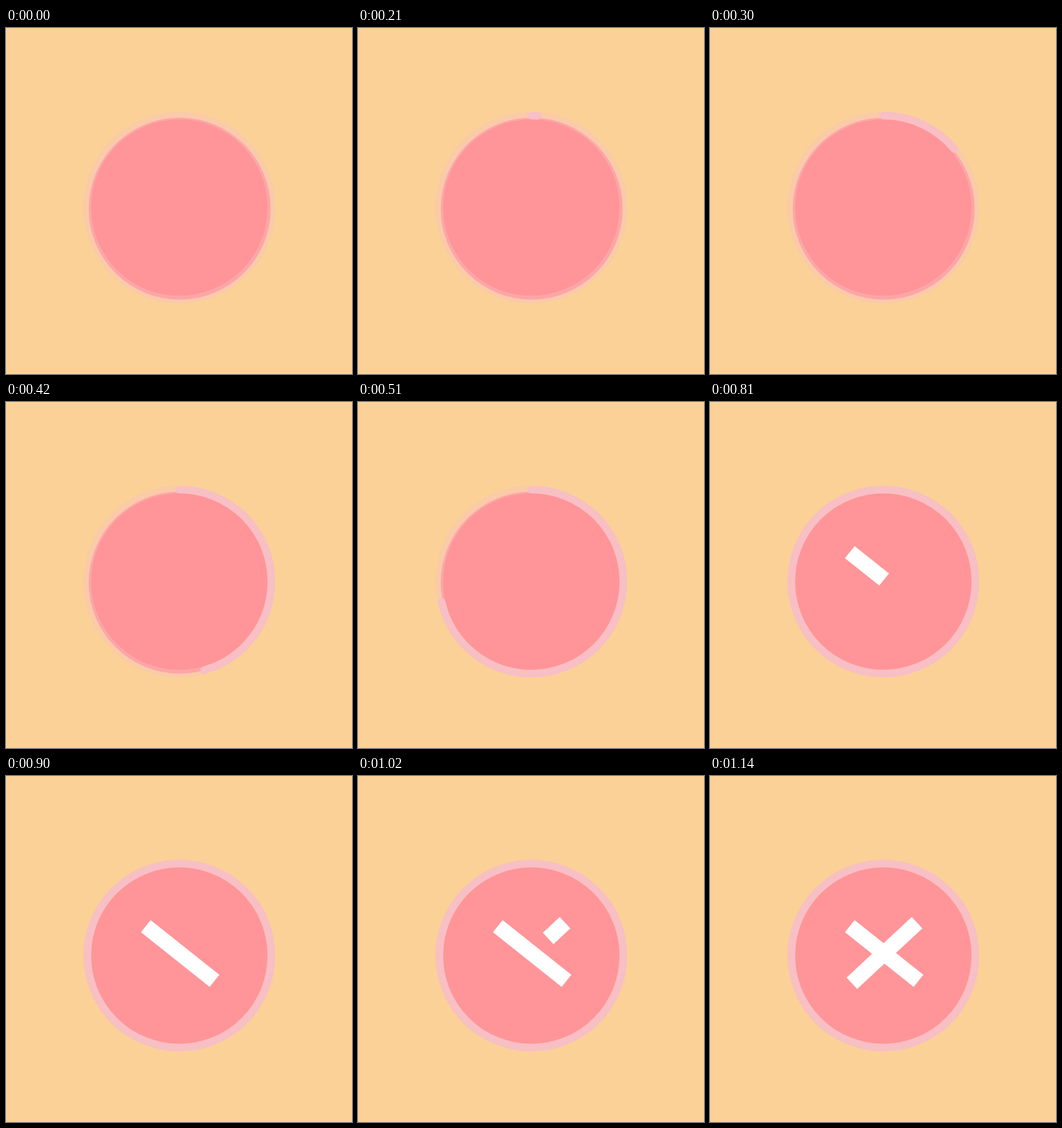
An HTML page for the animation above (1410 ms loop, 500 by 500 pixels).

```html
<!DOCTYPE html>
<html lang="en">
<head>
<meta charset="utf-8">
<title>Close button</title>
<style>
  html, body { margin: 0; width: 100%; height: 100%; overflow: hidden; background: #fbd197; }
  svg { display: block; width: 100%; height: 100%; }
</style>
</head>
<body>
<svg viewBox="0 0 500 500" fill="none">
  <rect width="500" height="500" fill="#fbd197"/>
  <circle cx="251" cy="261" r="131.5" fill="#ff9598"/>
  <g stroke="#f8bfc4" stroke-width="11">
    <circle cx="250.5" cy="259.5" r="133" opacity=".4"/>
    <path id="ring" d="M250.5 126.5a133 133 0 0 1 0 266a133 133 0 0 1 0-266" pathLength="1" stroke-linecap="round"/>
  </g>
  <g stroke="#fff" stroke-width="22.5">
    <path id="falling" d="M202 217L301.3 296" pathLength="1"/>
    <path id="rising" d="M299.2 212L205 299.5" pathLength="1"/>
  </g>
</svg>
<script>
  const LOOP = 1410;
  const STEP = 30;
  const strokes = [
    { id: "ring", start: 180, duration: 510 },
    { id: "falling", start: 720, duration: 180 },
    { id: "rising", start: 960, duration: 180 }
  ].map(s => ({ ...s, path: document.getElementById(s.id) }));

  const clamp = x => Math.min(1, Math.max(0, x));
  const ease = x => x * x * (3 - 2 * x);

  function render(time) {
    const t = Math.floor((time % LOOP) / STEP) * STEP;
    for (const { path, start, duration } of strokes) {
      const drawn = ease(clamp((t - start) / duration));
      path.style.visibility = drawn > 0 ? "visible" : "hidden";
      path.style.strokeDasharray = drawn < 1 ? `${drawn} 2` : "none";
    }
  }

  function tick() {
    render(performance.now());
    requestAnimationFrame(tick);
  }
  tick();
</script>
</body>
</html>
```
